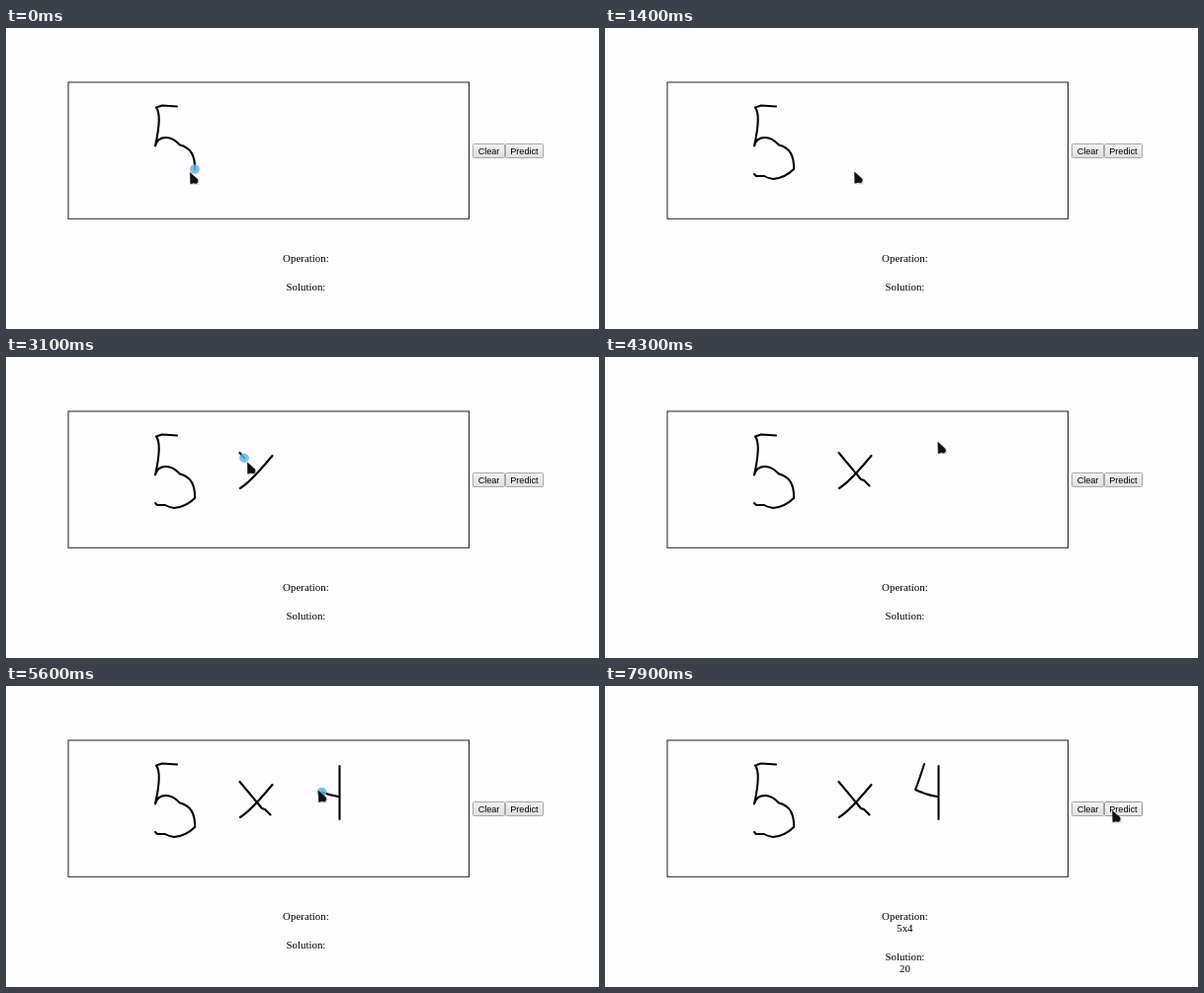
An HTML page that plays this animation: 600 px wide and 305 px high, repeating every 8 s.

```html
<!DOCTYPE html>
<html lang="en">
<head>
<meta charset="utf-8">
<title>Handwritten sum</title>
<style>
  html, body { margin: 0; width: 100%; height: 100%; overflow: hidden; background: #fefdff; }
  svg { display: block; width: 600px; height: 305px; }
  .ink path { fill: none; stroke: #000; stroke-width: 2.1; stroke-linecap: round; stroke-linejoin: round; }
  .label { font: 10.9px "Liberation Serif", "Times New Roman", serif; text-anchor: middle; fill: #000; }
  .button text { font: 9.1px "Liberation Sans", Arial, sans-serif; text-anchor: middle; fill: #000; }
  .button rect { fill: url(#face); stroke: #a8a8a8; }
  .button.hover rect { fill: url(#lit); stroke: #999; }
  .button.down rect { fill: #dcdcdc; }
</style>
</head>
<body>
<svg viewBox="0 0 600 305">
  <defs>
    <linearGradient id="face" x2="0" y2="1">
      <stop stop-color="#f3f3f3"/><stop offset="1" stop-color="#dedede"/>
    </linearGradient>
    <linearGradient id="lit" x2="0" y2="1">
      <stop stop-color="#f7f7f7"/><stop offset="1" stop-color="#e5e5e5"/>
    </linearGradient>
  </defs>

  <rect x="63" y="55" width="405.5" height="138.3" fill="none" stroke="#222"/>

  <g class="button">
    <rect x="472.5" y="117.5" width="32" height="14" rx="1"/>
    <text x="488.5" y="127.8">Clear</text>
  </g>
  <g class="button" id="predict">
    <rect x="505.5" y="117.5" width="38" height="14" rx="1"/>
    <text x="524.4" y="127.8">Predict</text>
  </g>

  <text class="label" x="303.4" y="237">Operation:</text>
  <text class="label" x="303.4" y="266" id="solution">Solution:</text>
  <g id="answer">
    <text class="label" x="303.4" y="249">5x4</text>
    <text class="label" x="303.4" y="290">20</text>
  </g>

  <g class="ink" id="ink">
    <path d="M173 79.5L158 78.5L152 80.5Q158 88 151 119.5Q153 111 162 111Q169 111 176 118.5Q192 122.5 191 143"/>
  </g>

  <circle id="touch" fill="#5cb8e8"/>
  <g id="cursor">
    <path d="M0 0L9 7.5V12.5H0Z" fill="#000" opacity=".13"/>
    <path d="M0 0L7.6 6.8V9.6L6.4 11L3.4 10.4L.4 11.2Z" fill="#111" stroke="#111" stroke-width=".6" stroke-linejoin="round"/>
  </g>
</svg>
<script>
  const LOOP = 8000, STEP = 100, LAG = 50, TRAVEL = 300;
  const $ = id => document.getElementById(id);
  const lerp = (a, b, k) => a + (b - a) * k;
  const clamp = k => Math.min(1, Math.max(0, k));

  function makeStroke(start, end, d) {
    const path = document.createElementNS("http://www.w3.org/2000/svg", "path");
    path.setAttribute("d", d);
    $("ink").append(path);
    const len = path.getTotalLength();
    const progress = t => clamp((t - start) / (end - start));
    const at = t => {
      const { x, y } = path.getPointAtLength(len * progress(t));
      return { x, y };
    };
    return { start, end, path, len, progress, at };
  }

  // The pen runs along each stroke; the ink trails it by LAG.
  const strokes = [
    makeStroke(-50, 350, "M191 143Q182 152 170 153Q164 152 161 150H153L151 148"),
    makeStroke(2100, 2500, "M269.5 100Q248 126 237 133"),
    makeStroke(2990, 3380, "M236.5 97L259 124L262 125L267.5 130.5"),
    makeStroke(4400, 4700, "M337.5 81V135"),
    makeStroke(5280, 6080, "M336 112Q324 110 314 105Q317 98 323 79")
  ];
  const click = { start: 6650, end: 6750, at: pointer };

  // Places the pointer reaches between strokes.
  const stop = (t, x, y) => ({ t, x, y });
  const stops = [
    stop(900, 312, 205), stop(1400, 253, 146), stop(1500, 245, 121),
    stop(1800, 237, 132), stop(2900, 236.5, 97), stop(3900, 337, 97),
    stop(6500, 518, 119), stop(7000, 523, 122), stop(7900, 514, 126.5),
    ...strokes.flatMap(s => [s.start, s.end].map(t => ({ t, ...s.at(t) })))
  ].sort((a, b) => a.t - b.t);

  // Between stops the pointer rests, then travels just before arrival.
  function pointer(t) {
    const stroke = strokes.find(s => t >= s.start && t <= s.end);
    if (stroke) return stroke.at(t);
    const i = stops.findIndex(s => s.t > t);
    if (i < 0) return stops.at(-1);
    const a = stops[i - 1], b = stops[i];
    const leave = Math.max(a.t, b.t - TRAVEL);
    const k = clamp((t - leave) / (b.t - leave));
    return { x: lerp(a.x, b.x, k), y: lerp(a.y, b.y, k) };
  }

  // A press is a steady dot; on release it spreads and fades.
  function showTouch(t) {
    const press = [...strokes, click].find(p => t >= p.start && t < p.end + 200);
    $("touch").style.display = press ? "" : "none";
    if (!press) return;
    const { x, y } = press.at(Math.min(t, press.end));
    const k = clamp((t - press.end) / 200);
    $("touch").setAttribute("cx", x);
    $("touch").setAttribute("cy", y);
    $("touch").setAttribute("r", lerp(4.8, 9, k));
    $("touch").setAttribute("opacity", lerp(.85, 0, k));
  }

  function draw(t) {
    for (const s of strokes) {
      const k = s.progress(t - LAG);
      s.path.style.visibility = k > 0 ? "visible" : "hidden";
      s.path.style.strokeDasharray = k < 1 ? `${s.len * k} ${s.len + 9}` : "none";
    }
    showTouch(t - LAG);

    const { x, y } = pointer(t);
    $("cursor").setAttribute("transform", `translate(${x - .5} ${y})`);
    $("predict").classList.toggle("hover", x > 505 && y > 117);
    $("predict").classList.toggle("down", t >= 6700 && t < 6800);

    const solved = t >= 7200;
    $("answer").style.display = solved ? "" : "none";
    $("solution").setAttribute("y", solved ? 278 : 266);
  }

  const origin = performance.now();
  function tick() {
    const t = (performance.now() - origin) % LOOP;
    draw(Math.floor(t / STEP) * STEP);
    requestAnimationFrame(tick);
  }
  tick();
</script>
</body>
</html>
```
